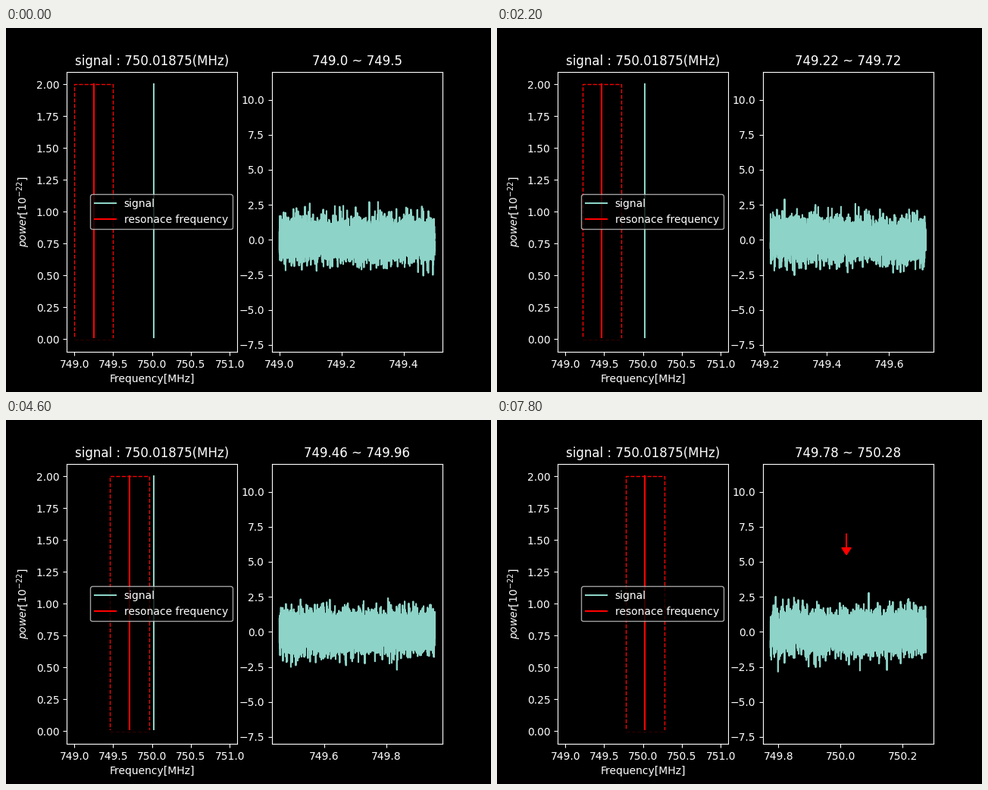
Write a matplotlib script that moves like this. It is 640 px wide and 480 px high and loops after 8 s.

```python
import numpy as np
import matplotlib.pyplot as plt
from matplotlib.animation import FuncAnimation
from matplotlib.patches import Rectangle

plt.style.use("dark_background")

FRAMES = 40
INTERVAL = 200
SIGNAL = 750.01875
START, SPAN = 749.0, 0.5
LABEL_STEP = 0.02      # step of the window and its title
SCAN_STEP = 0.01985    # step of the sampled band
POINTS = 5000
SIGMA = 0.76

fig, (left, right) = plt.subplots(1, 2, figsize=(6.4, 4.8), dpi=100)

left.set_title(f"signal : {SIGNAL}(MHz)")
left.set_xlabel("Frequency[MHz]")
left.set_ylabel("$power[10^{-22}]$")
left.plot([SIGNAL, SIGNAL], [0, 2], label="signal")
resonance, = left.plot([START, START], [0, 2], color="red",
                       label="resonace frequency")
left.plot([749, 751], [0, 0], color="black")
window = left.add_patch(Rectangle((START, 0), SPAN, 2, fill=False,
                                  edgecolor="red", linestyle="--"))
left.set_xlim(748.9, 751.1)
left.set_ylim(-0.1, 2.1)
left.legend(loc="center right")


def update(i):
    low = START + LABEL_STEP * i
    first = START + SCAN_STEP * i
    last = first + SPAN

    window.set_x(low)
    middle = first + SPAN / 2
    resonance.set_xdata([middle, middle])

    right.cla()
    rng = np.random.default_rng(100 + i)
    right.plot(np.linspace(first, last, POINTS), rng.normal(0, SIGMA, POINTS))
    if first <= SIGNAL <= last:
        right.arrow(SIGNAL, 7, 0, -1, head_width=0.03, head_length=0.5,
                    color="red")
    margin = SPAN * 0.05
    right.set_xlim(first - margin, last + margin)
    right.set_ylim(-8, 12)
    right.set_title(f"{round(low, 2)} ~ {round(low + SPAN, 2)}")


anim = FuncAnimation(fig, update, frames=FRAMES, interval=INTERVAL,
                     init_func=lambda: None, repeat=True, repeat_delay=0)
plt.show()
```
